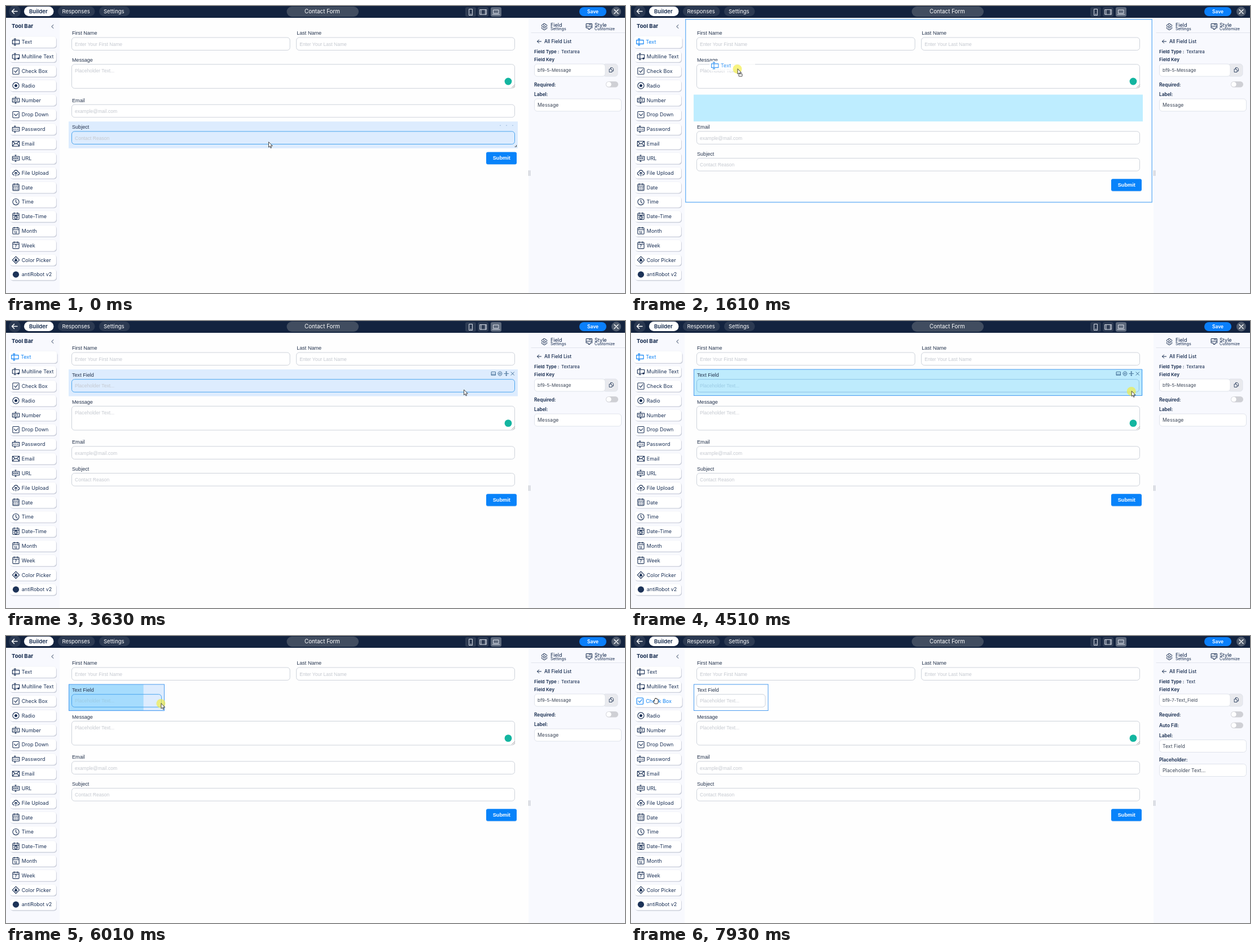
These frames come from a looping animation (1097x510 px, 8 s). An HTML page:

```html
<!DOCTYPE html>
<html lang="en">
<head>
<meta charset="utf-8">
<title>Form builder</title>
<style>
html, body { margin: 0; width: 100%; height: 100%; overflow: hidden; background: #fefefe; }
svg { display: block; width: 1097px; height: 510px; font-family: Inter, sans-serif; white-space: pre; }
.form { font-family: "Liberation Sans", Arial, sans-serif; }
</style>
</head>
<body>
<svg viewBox="0 0 1097 510"><g id="base"></g><g id="live"></g></svg>
<script>
const LOOP = 8000, ROW = 47.65, COL = 66.33, LEFT = 111, RIGHT = 907;
const NAVY = '#10264a', BLUE = '#0a80f5', TINT = 'rgba(0,120,255,.13)';

const rect = (x, y, x2, y2, r, fill, more = '') =>
  `<rect x="${x}" y="${y}" width="${x2 - x}" height="${y2 - y}" rx="${r}" fill="${fill}" ${more}/>`;
const text = (x, y, size, str, fill = NAVY, weight = 400) =>
  `<text x="${x}" y="${y}" font-size="${size}" fill="${fill}" font-weight="${weight}">${str}</text>`;
const path = (d, color = NAVY, width = 1.2, fill = 'none') =>
  `<path d="${d}" stroke="${color}" stroke-width="${width}" fill="${fill}" stroke-linecap="round" stroke-linejoin="round"/>`;
const circle = (x, y, r, fill, more = '') => `<circle cx="${x}" cy="${y}" r="${r}" fill="${fill}" ${more}/>`;
const move = (x, y, body) => `<g transform="translate(${x} ${y})">${body}</g>`;

const smooth = u => { u = Math.min(1, Math.max(0, u)); return u * u * (3 - 2 * u); };
// keys: [time, value, value...]; eased between neighbours, held outside
function track(t, keys) {
  let i = 0;
  while (i < keys.length - 2 && t >= keys[i + 1][0]) i++;
  const a = keys[i], b = keys[i + 1], s = smooth((t - a[0]) / (b[0] - a[0]));
  return a.slice(1).map((v, k) => v + (b[k + 1] - v) * s);
}

const POINTER = [
  [70, 465.5, 242], [270, 95, 72], [500, 95, 72], [800, 57, 70], [1220, 62, 72], [1310, 62, 72],
  [1610, 189, 112], [1840, 208, 105], [3010, 208, 105], [3810, 900, 125], [4430, 901, 125],
  [5230, 421.5, 121], [5310, 421.5, 121], [5850, 275, 120], [6010, 275, 120], [6470, 238, 120],
  [6620, 238, 120], [6850, 245, 120], [7380, 70, 117], [7450, 70, 117], [7930, 44, 115]
];
const EDGE = [
  [4490, RIGHT, 0], [5230, 426, 0], [5310, 426, 0], [5850, 281, 0], [6010, 281, 0], [6470, 243.5, 0]
];

// Toolbar icons on a 24 unit grid
const BEAM = 'M9 2v20M6 2h6M6 22h6M9 6H1v12h8M9 6h14v12H9';
const BOX = 'M4 2h16q2 0 2 2v16q0 2-2 2H4q-2 0-2-2V4q0-2 2-2z';
const CAL = BOX + 'M2 8h20M7 0v4M17 0v4';
const RING = 'M2 12a10 10 0 1 0 20 0a10 10 0 1 0-20 0z';
const dots = (y, c) => [6, 12, 18].map(x => circle(x, y, 1.7, c)).join('');
const glyph = (x, y, s, str, c) => text(x, y, s, str, c, 700);
const TOOLS = [
  ['Text', BEAM],
  ['Multiline Text', BEAM, c => circle(20, 18, 3, c)],
  ['Check Box', BOX + 'M7 12l4 4 7-9'],
  ['Radio', RING, c => circle(12, 12, 4.5, c)],
  ['Number', 'M9 2h4M9 22h4M11 2v4M11 18v4M1 6h22v12H1z', c => glyph(3, 15.5, 9.5, '123', c)],
  ['Drop Down', BOX + 'M7 10l5 5 6-6'],
  ['Password', 'M7 2h4M7 22h4M9 2v4M9 18v4M1 6h22v12H1z', c => dots(12, c)],
  ['Email', 'M1 4h22v16H1zM1 4l11 9 11-9M1 20l8-9M23 20l-8-9'],
  ['URL', 'M9 2h4M9 22h4M11 2v4M11 18v4M1 6h22v12H1z', c => glyph(2.5, 14.5, 7, 'www', c)],
  ['File Upload', 'M7 19H5q-4-1-4-5t5-5q2-6 7-5t6 6q4 0 4 4t-5 5h-1M12 22V11M8 14l4-4 4 4'],
  ['Date', CAL, c => dots(13, c) + dots(18, c)],
  ['Time', RING + 'M12 6v6l4 4'],
  ['Date-Time', CAL + 'M7 15a5 5 0 1 0 10 0a5 5 0 1 0-10 0M12 12v3h2'],
  ['Month', CAL, c => glyph(6, 19, 9.5, '12', c)],
  ['Week', CAL, c => glyph(9, 19, 10, '7', c)],
  ['Color Picker', 'M12 1l11 11-11 11L1 12z', c => path('M12 7q8 9 0 10q-8-1 0-10z', c, 1, c)],
  ['antiRobot v2', '', c => circle(12, 12, 10, c)]
];

function toolFace(i, x, y, color) {
  const [name, d, extra] = TOOLS[i];
  return `<g transform="translate(${x} ${y - 6.7}) scale(.56)">${path(d, color, 2)}${extra ? extra(color) : ''}</g>` +
    text(x + 17, y + 3.3, 9, name, color);
}

function tool(i, hot) {
  const y = 64 + i * 25.82, g = hot ? 1.6 : 0;
  return rect(7.5 - g, y - 8.5, 90 + g, y + 11.3 + g / 2, 5, '#c6cad6') +
    rect(6.5 - g, y - 10 - g / 2, 89 + g, y + 10 + g / 2, 5, '#fff', 'stroke="#eceef5" stroke-width=".6"') +
    toolFace(i, 10.8 - g, y, hot ? BLUE : '#1c3257');
}

function header() {
  const pill = (x, x2, fill) => rect(x, 1, x2, 18, 8.5, fill);
  const device = (x, fill, d) => rect(x, 2, x + 19, 19, 3, fill) + path(d, '#dce1ea', 1);
  return rect(0, 0, 1097, 21, 0, '#13233f') +
    circle(15.5, 9.5, 10.5, '#2a3851') + path('M20 9.5H10.5M14.5 5.5l-4 4 4 4', '#fff', 1.5) +
    pill(32, 84.5, '#fff') + text(41, 13, 9.6, 'Builder', NAVY, 600) +
    pill(92, 157.5, '#2c3a52') + text(99.5, 13, 9.5, 'Responses', '#fff') +
    pill(165, 219.5, '#2c3a52') + text(173, 13, 9.5, 'Settings', '#fff') +
    rect(497.5, 1, 625, 19, 9, '#414d60') + text(529, 13.4, 9.8, 'Contact Form', '#fff') +
    device(814, '#2d3b53', 'M821 5.5h5.5v11H821zM823 14.5h1.5') +
    device(836, '#2d3b53', 'M840 6.5h11.5v8.5H840zM842 6.5v8.5M849.5 6.5v8.5') +
    device(859, '#5d697c', 'M864 7h9v6h-9zM862 15h13') +
    rect(1016, 2, 1064, 18, 8, '#0a7ffa') + text(1030, 13, 8.5, 'Save', '#fff', 600) +
    circle(1081.5, 10, 8.5, '#515d6f') + path('M1078 6.5l7 7M1085 6.5l-7 7', '#fff', 1.4);
}

function base() {
  return rect(0, 21, 95, 510, 0, '#f8f9fe') + rect(926, 21, 1097, 510, 0, '#f8f9fe') + header() +
    text(10, 39.3, 9.6, 'Tool Bar', NAVY, 700) + path('M84 33.5l-3.2 3 3.2 3', NAVY, .9) +
    path('M926.5 292.5v9M928.8 292.5v9', '#a9aeb8', .8) +
    path('M931 47.5h166', '#e1e4ec', 1) +
    circle(954, 37, 2, 'none', `stroke="${NAVY}"`) +
    path('M952.7 31.5h2.6l.5 1.7 1.7-.4 1.5 2.2-1.2 1.2v1.4l1.2 1.2-1.5 2.2-1.7-.4-.5 1.7h-2.6l-.5-1.7-1.7.4-1.5-2.2 1.2-1.2v-1.4l-1.2-1.2 1.5-2.2 1.7.4z', NAVY, .9) +
    text(965, 36.8, 9.1, 'Field') + text(965, 43.4, 7.2, 'Settings') +
    path('M1028.5 31.5h10v7.5h-3.5v2.5h-3v-2.5h-3.5zM1028.5 36h10M1034 31.5v2M1036 31.5v2', NAVY, 1) +
    text(1043, 36.8, 9.1, 'Style') + text(1043, 43.4, 7.2, 'Customize') +
    path('M948.5 63h-7M944.5 60l-3 3 3 3', NAVY, 1) + text(954, 65.6, 8.4, 'All Field List', NAVY, 500) +
    text(936, 83.8, 8, 'Field Type :', NAVY, 600) + text(936, 97.8, 8.2, 'Field Key', NAVY, 600);
}

function panel(isText) {
  const box = (x2, y, str, size) =>
    rect(936.5, y, x2, y + 22, 5, '#fff', 'stroke="#dfe3eb"') + text(942, y + 14, size, str, '#3c4657');
  const label = (y, str) => text(936, y + 3, 8.3, str, NAVY, 600);
  const toggle = y => rect(1063, y - 5, 1085, y + 5.5, 5.2, '#cfd0d5') + circle(1068.3, y + .2, 4.4, '#fff');
  return text(984, 83.8, 8, isText ? 'Text' : 'Textarea') +
    rect(1058, 103, 1084, 125, 5, '#e9eaee', 'stroke="#dfe3eb"') +
    box(1062, 103, isText ? 'bf9-7-Text_Field' : 'bf9-5-Message', 8) +
    path('M1071.5 112v-2.5h3l2 2v4h-2M1069.5 112h3.5l1 1v4.5h-4.5z', NAVY, .8) +
    label(139.5, 'Required:') + toggle(139) +
    (isText
      ? label(158.8, 'Auto Fill:') + toggle(158.4) + label(177, 'Label:') + box(1090.5, 184.5, 'Text Field', 8.7) +
        label(219.7, 'Placeholder:') + box(1090.5, 227.5, 'Placeholder Text...', 8.7)
      : label(157.3, 'Label:') + box(1090.5, 165, 'Message', 8.7));
}

function field(f, hot) {
  const { x, x2, y, h } = f, r = x2 - 5.5;
  let s = hot ? rect(x, y, x2, y + h, 0, TINT) : '';
  s += rect(x + 5.5, y + 17.7, r, y + (f.area ? 60.3 : 40.3), 5, hot || f.sizing ? 'none' : '#fff',
    `stroke="${hot ? '#4aa5ee' : f.sizing ? '#8cc4e6' : '#cdd2da'}"`);
  s += text(x + 6, y + 13, 9.1, f.name, '#24334d') +
    text(x + 11, y + 32.4, 8.55, f.hint, f.sizing ? '#9ccbe4' : '#c5c9d0');
  if (f.area) s += path(`M${r - 5} ${y + 59}l5-5M${r - 2} ${y + 59}l2-2`, '#888', .8) + circle(890, y + 48, 6.4, '#13b5a0');
  return s;
}

const actions = y => move(0, y, path(
  'M860.5 4.5h7v6h-7zM860.5 8.5h7M873 5l1.5-1h2l1.500 1 1 2.500-1 2.500-1.500 1h-2l-1.500-1-1-2.500zM874.200 7.500a1.300 1.300 0 1 0 2.600 0a1.300 1.300 0 1 0-2.600 0' +
  'M883 7.5h7.500M886.700 4v7.200M885.500 5l1.200-1.200 1.200 1.200M885.500 10l1.200 1.200 1.200-1.200M895 4.800l5.500 5.500M900.500 4.800l-5.500 5.500', '#34618c', .9));

function pointer(t, x, y, dragging) {
  if (x < 90 && !dragging || t >= 2470 && t < 3080)
    return move(x, y, path('M-2.3 5L-4.6 1.2q-.3-1.4 1.400-.8l.8.8V-3q.7-1.300 1.500 0v-1.200q.9-1.100 1.800 0v1q.9-1 1.700 0v1.200q.9-.9 1.600.2V2L3 5z', '#222', .9, '#fff'));
  const arrow = path('M0 0V9l2-1.900L3.600 10.500l1.400-.6L3.500 6.600h2.900z', '#333', .9, '#fff');
  return move(x, y, arrow + (dragging ? rect(2, 8.5, 8, 13, .5, '#fff', 'stroke="#333" stroke-width=".9"') : ''));
}

function live(t) {
  const [x, y] = track(t, POINTER), [edge] = track(t, EDGE);
  const dragging = t >= 950 && t < 2470, placed = t >= 2470;
  const sizing = t >= 4250 && t < 6620, pulled = sizing && t >= 4520;
  const grow = smooth((t - 1390) / 150) * ROW, swap = smooth((t - 1680) / 150);

  const full = { x: LEFT, x2: RIGHT, h: ROW };
  const fields = [
    { ...full, x2: 508.700, y: 38.3, name: 'First Name', hint: 'Enter Your First Name' },
    { ...full, x: 509.2, y: 38.3, name: 'Last Name', hint: 'Enter Your Last Name' },
    { ...full, y: 86 + grow * swap, h: 71.5, area: true, name: 'Message', hint: 'Placeholder Text...' },
    { ...full, y: 157.5 + grow, name: 'Email', hint: 'example@mail.com' },
    { ...full, y: 205.2 + grow, name: 'Subject', hint: 'Contact Reason' }
  ];
  const added = { ...full, y: 86, x2: edge, sizing, name: 'Text Field', hint: 'Placeholder Text...' };
  if (placed) fields.push(added);

  let s = TOOLS.map((_, i) => tool(i, i === 0 && t >= 620 && t < 4600 || i === 2 && t > 7000 && x < 90)).join('');
  s += panel(t >= 6690);

  let form = '';
  if (grow && !placed) form += rect(LEFT, 157.5 - 71.5 * swap, RIGHT, 157.5 - 71.5 * swap + grow, 0, '#beedff');
  if (sizing) {
    const cols = Math.floor((edge - LEFT) / COL + .03);
    form += rect(LEFT, 86, LEFT + cols * COL, 132.700, 0, '#beebfd');
  }
  const canHover = !dragging && !sizing && (t < 2470 || t >= 3080);
  for (const f of fields) {
    const over = canHover && x > f.x && x < f.x2 && y > f.y && y < f.y + f.h;
    form += field(f, over || pulled && f === added);
    if (over && t < 110) {
      form += [876, 887, 898].map(cx => circle(cx, f.y + 7, .7, '#7fa3c8')).join('');
      form += path('M902 250h2.500v-2.500', '#444', 1);
    } else if (over && f.x2 === RIGHT || f === added && sizing && !pulled) form += actions(f.y);
  }
  if (t >= 4250) form += rect(LEFT + .5, 86, edge - .5, 132.5, 0, 'none', 'stroke="#4b9cf0"');
  const sy = 259.500 + grow;
  form += rect(851, sy + 1, 905, sy + 22.5, 3, '#cfe0f3') + rect(851, sy, 905, sy + 21.7, 3, '#0883fa') +
    text(862.7, sy + 13.8, 9.2, 'Submit', '#fff', 700);
  s += `<g class="form">${form}</g>`;

  if (t >= 950 && t < 2530) s += rect(96.7, 23.7, 923.3, 301 + grow, 0, 'none', 'stroke="#74b6f6" stroke-width="1.5"');
  if (dragging) {
    const gx = x - 47, gy = y - 6;
    s += rect(gx - 3, gy - 9, gx + 78, gy + 10, 4, '#fff', 'opacity=".75"') +
      `<g opacity=".8">${toolFace(0, gx, gy, BLUE)}</g>`;
  }
  if (t >= 900 && t < 2470 || t >= 3950 && t < 6620) s += circle(x - .5, y, 8, '#f3ec3c', 'opacity=".65"');
  return s + pointer(t, x, y, dragging);
}

const stage = document.getElementById('live');
document.getElementById('base').innerHTML = base();
let last = '';
function draw() {
  const next = live(performance.now() % LOOP);
  if (next !== last) stage.innerHTML = last = next;
  requestAnimationFrame(draw);
}
draw();
</script>
</body>
</html>
```
